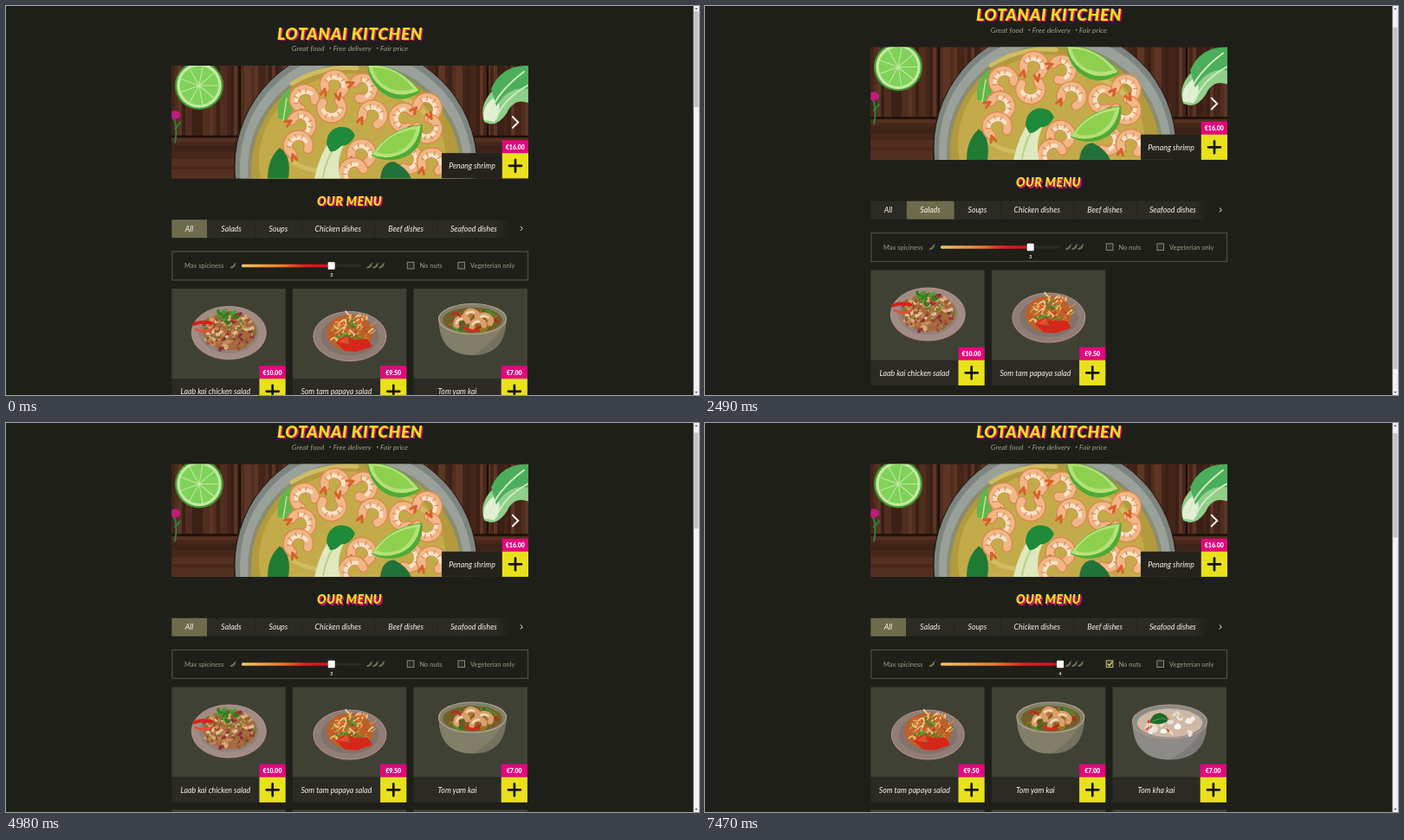
An HTML page for the animation above (8 s loop, 800 by 450 pixels).

```html
<!DOCTYPE html>
<html lang="en">
<head>
<meta charset="utf-8">
<title>Restaurant menu</title>
<style>
  html, body { margin: 0; width: 100%; height: 100%; overflow: hidden; background: #1f1f1a; }
  svg { display: block; }
  text { font: 7.5px Lato, 'Noto Sans CJK JP', sans-serif; fill: #a09c83; white-space: pre; }
  .label { font-size: 8.75px; font-style: italic; fill: #f7f4ea; }
  .tagline { font-size: 8.45px; font-style: italic; }
  .price { font-size: 7px; font-weight: 900; fill: #fff; }
  .title { font-weight: 900; font-style: italic; }
  .level { font-size: 5.2px; font-weight: 700; fill: #eee; }
  .status { font: 6.1px 'Open Sans', sans-serif; fill: #444; }
</style>
</head>
<body>
<svg id="stage" width="800" height="450" viewBox="0 0 800 450"></svg>
<script>
const YELLOW = '#e9e11b', PINK = '#e4067e', LOOP = 8000, STEP = 830;

const MENU = [
  ['Laab kai chicken salad', '10.00', 'laab'],
  ['Som tam papaya salad', '9.50', 'somtam'],
  ['Tom yam kai', '7.00', 'yam'],
  ['Tom kha kai', '7.00', 'kha'],
  ['Tom kha koong', '8.00', 'kha'],
  ['Tom yam vegetarian', '7.00', 'yam'],
  ['Tom kha vegetarian', '7.00', 'kha'],
  ["Sweet 'n sour chicken", '14.00', 'sour'],
  ['Chicken cashew', '14.00', 'cashew']
];
const TABS = [['All', 191.3, 232.2], ['Salads', 232.7, 287.7], ['Soups', 288.2, 341],
  ['Chicken dishes', 341.5, 425.4], ['Beef dishes', 425.9, 497.7], ['Seafood dishes', 498.2, 582]];

const ALL = [0, 1, 2, 3, 4, 5, 6, 7, 8];
const view = (scroll, tab, dishes, rows, more) =>
  ({ scroll, tab, dishes, rows, hover: -1, spice: 3, noNuts: false, ...more });
const VIEWS = [
  view(0, 0, ALL, 10),
  view(215, 0, ALL, 10),
  view(215, 0, ALL, 10, { hover: 1 }),
  view(21.5, 1, [0, 1], 1),
  view(21.5, 2, [2, 3, 4, 5, 6], 2, { hover: 3 }),
  view(21.5, 3, [7, 8], 1),
  view(21.5, 0, ALL, 10),
  view(21.5, 0, [1, 5, 6, 7, 8, 4], 5, { spice: 1 }),
  view(21.5, 0, ALL, 10, { spice: 4 }),
  view(21.5, 0, [1, 2, 3, 4, 5, 6], 9, { spice: 4, noNuts: true })
];

const rect = (x, y, w, h, fill, extra = '') =>
  `<rect x="${x}" y="${y}" width="${w}" height="${h}" fill="${fill}" ${extra}/>`;
const oval = (x, y, rx, ry, fill, extra = '') =>
  `<ellipse cx="${x}" cy="${y}" rx="${rx}" ry="${ry}" fill="${fill}" ${extra}/>`;
const shape = (d, fill, extra = '') => `<path d="${d}" fill="${fill}" ${extra}/>`;
const line = (d, color, width) =>
  `<path d="${d}" fill="none" stroke="${color}" stroke-width="${width}" stroke-linecap="round"/>`;
const text = (s, x, y, cls = '', anchor = 'middle', extra = '') =>
  `<text x="${x}" y="${y}" class="${cls}" text-anchor="${anchor}" ${extra}>${s}</text>`;
const move = (x, y, body, turn = 0) => `<g transform="translate(${x} ${y}) rotate(${turn})">${body}</g>`;

function random(seed) {
  return () => (seed = seed * 16807 % 2147483647) / 2147483647;
}

// Short random strokes scattered inside an ellipse.
function scatter(seed, count, colors, cy, rx, ry, length, width) {
  const rnd = random(seed * 7919);
  let out = '';
  for (let i = 0; i < count; i++) {
    const a = rnd() * 6.283, r = Math.sqrt(rnd()), b = rnd() * 6.283;
    const x = rx * r * Math.cos(a), y = cy + ry * r * Math.sin(a);
    const dx = length * Math.cos(b), dy = length * .7 * Math.sin(b);
    out += line(`M${x.toFixed(1)},${y.toFixed(1)}q${dy.toFixed(1)},${dx.toFixed(1)} ${dx.toFixed(1)},${dy.toFixed(1)}`,
      colors[Math.floor(rnd() * colors.length)], width * (.6 + rnd() * .7));
  }
  return out;
}

const plate = (rx, ry, y, fill) =>
  oval(0, y + 1.5, rx, ry, '#5a4a43') +
  oval(0, y, rx, ry, fill, 'stroke="#b9958b" stroke-width="1"') +
  oval(0, y, rx * .8, ry * .78, '#00000016');

const bowl = (r, cy, ry, bottom, fill, rim, soup) =>
  shape(`M${-r},${cy}C${-r},${bottom * .6} ${-r * .6},${bottom} 0,${bottom}S${r},${bottom * .6} ${r},${cy}Z`, fill) +
  shape(`M${r},${cy}C${r},${bottom * .6} ${r * .6},${bottom} 0,${bottom}Q${r * .7},${bottom * .5} ${r},${cy}`, '#0000001c') +
  oval(0, cy, r, ry, fill, `stroke="${rim}" stroke-width="1.2"`) +
  oval(0, cy + 1.5, r * .88, ry * .84, soup);

const FOOD = {
  laab: () => move(0, -1,
    plate(43, 30.5, 0, '#a08c84') + oval(1, -2, 31, 22, '#a36a3e') +
    scatter(5, 170, ['#c98d58', '#d9a877', '#96552c', '#b5713f', '#e0bd92', '#c0854c', '#6d7d2c', '#8a3038'], -2, 31, 22, 3, 2.7) +
    scatter(8, 10, ['#2f7d22', '#4a9a2c'], -20, 14, 7, 5, 3) +
    line('M-40,-10q10,-4 20,-1', '#d9201a', 4) + line('M-38,-4q9,4 18,0', '#ee4a35', 3)),
  somtam: () => move(0, 2,
    plate(42, 28.5, 1, '#8f7d76') + oval(0, -3, 27, 21, '#b9622a') +
    scatter(12, 75, ['#e2a14a', '#efc277', '#d87a2a', '#f0d29a', '#c23a1c', '#d9581f'], -8, 26, 18, 7, 1.5) +
    shape('M-16,8l12,-9 9,6 16,-1 5,9 -18,6 -14,-1z', '#d6261a') +
    shape('M-14,8l11,-7 3,9z', '#ef4a31') +
    scatter(4, 13, ['#3f8a2a', '#64a63a'], -8, 23, 15, 7, 1.4)),
  yam: () => move(2, -5,
    bowl(39, -12, 17.5, 30, '#827f69', '#b5a48e', '#73602a') +
    scatter(3, 34, ['#8a7a26', '#3d6f22', '#b5762c', '#a63018', '#9a6a2a'], -10, 30, 12, 5, 3) +
    [[-13, -9, -20], [-1, -17, 10], [15, -12, 25], [6, -6, -5]].map(([x, y, a]) =>
      move(x, y, line('M-7,3q1,-8 8,-7t6,6', '#d99f6c', 6.5) + line('M-6,0q3,-4 8,-3', '#f3dab5', 2.4), a)).join('') +
    line('M-8,-1q7,4 15,2', '#d72b18', 2.6) + line('M-24,-17q6,-4 10,2', '#c0271a', 2.4) +
    line('M16,-22l9,5M-22,-2l8,5', '#4d8d2b', 2.4)),
  kha: () =>
    bowl(43, -12, 19.5, 32, '#8d8b88', '#b3968a', '#cdb9a6') +
    scatter(6, 20, ['#ece1d3', '#f4ede4', '#d8b69c', '#e7d6c4'], -9, 32, 12, 6, 4) +
    scatter(9, 9, ['#d8432b', '#e8734e'], -8, 28, 10, 3, 1.8) +
    oval(9, -6, 4, 3, '#fff') + oval(-7, -1, 4, 2.5, '#fff') +
    shape('M-23,-11q2,-11 12,-11q11,3 8,10q-9,5 -20,1z', '#1d6a2a') +
    line('M-20,-12q8,-5 15,-3', '#53a044', 1),
  sour: () => move(3, 2,
    bowl(40, -8, 19, 31, '#b5a9aa', '#cbb1a9', '#9c3a16') +
    scatter(14, 75, ['#f2a41c', '#e0361c', '#f5c23a', '#d96a1e', '#ba2415', '#f08a22'], -12, 31, 17, 8, 4.2) +
    scatter(2, 6, ['#4d8d2b', '#6a4a1c'], -10, 26, 12, 6, 2.5)),
  cashew: () => move(0, 2,
    bowl(42.5, -3, 23, 27, '#96654a', '#bd8a70', '#8a451e') +
    scatter(17, 120, ['#e28a2a', '#c9331a', '#e9c27a', '#3d8a2a', '#b06a2a', '#f1d9a2', '#d3551f'], -5, 35, 20, 5, 3.2) +
    scatter(11, 9, ['#3d9a30', '#6fbb48'], -16, 18, 9, 6, 2.4))
};
const DISH = Object.fromEntries(Object.entries(FOOD).map(([name, draw]) => [name, draw()]));

// Price tag above a yellow add button.
const order = (x, y, price) =>
  rect(x, y - 15, 30.2, 15.2, PINK) + text('€' + price, x + 15, y - 4.7, 'price') +
  rect(x, y, 30.2, 29.2, YELLOW) +
  line(`M${x + 8.2},${y + 14.6}h14M${x + 15.2},${y + 7.6}v14`, '#14140f', 2.7);

function card(index, slot) {
  const [name, price, food] = MENU[index];
  const x = 191.3 + slot % 3 * 139.6, y = 327 + Math.floor(slot / 3) * 141.8;
  return rect(x, y, 131.4, 104.3, '#3f4135') + rect(x, y + 104.3, 131.4, 29, '#2b2a25') +
    move(x + 66, y + 52, DISH[food]) +
    text(name, x + 50.5, y + 122, 'label') + order(x + 101.2, y + 104.2, price);
}

const heading = (s, x, y, size, spacing) => [[PINK, 1.6], [YELLOW, 0]].map(([fill, d]) =>
  text(s, x + d, y + d * .8, 'title', 'middle',
    `style="fill:${fill};font-size:${size}px;letter-spacing:${spacing}px"`)).join('');

const shrimp = (x, y, turn) => move(x, y,
  line('M-10,8A12,12 0 1 1 9,9', '#dc8a50', 12) +
  line('M-10,8A12,12 0 1 1 9,9', '#f0b888', 9) +
  line('M-9,-3A11,11 0 0 1 10,0', '#fbe3ca', 4.5) +
  line('M-13,-2l4,2M-8,-9l2,4M1,-12l0,4M9,-8l-3,3', '#e08a50', 1.3) +
  line('M-10,9l-3,7M-10,9l3,7', '#d8602c', 3), turn);

const wedge = (x, y, turn) => move(x, y,
  shape('M-34,-8Q0,-20 34,2Q16,28 -12,16Q-28,8 -34,-8z', '#4faa35') +
  shape('M-33,-8Q0,-19 32,2Q12,20 -10,12Q-26,6 -33,-8z', '#b4e277') +
  shape('M-27,-7Q0,-15 25,2Q8,14 -10,8Q-22,3 -27,-7z', '#8ed04e'), turn);

function lime(x, y, r) {
  let spokes = '';
  for (let i = 0; i < 9; i++) {
    const a = i * .698;
    spokes += `M${x},${y}l${(r * .78 * Math.cos(a)).toFixed(1)},${(r * .78 * Math.sin(a)).toFixed(1)}`;
  }
  return oval(x, y, r, r, '#3f9a35') + oval(x, y, r * .92, r * .92, '#c5e8a0') +
    oval(x, y, r * .8, r * .8, '#7fd25a') + line(spokes, '#c5e8a0', 1.1);
}

// Upright boards above one lying board.
function wood() {
  const rnd = random(4242);
  let out = rect(191, 69, 412, 131, '#4b2a1c');
  for (let x = 191; x < 603; x += 4)
    out += rect(x, 69, 4, 82, ['#452518', '#5c3524', '#3a2016', '#512d1e'][Math.floor(rnd() * 4)]);
  for (let y = 153; y < 200; y += 4)
    out += rect(191, y, 412, 4, ['#47271a', '#553021', '#3d2218'][Math.floor(rnd() * 3)]);
  return out + line('M191,151h412M270,69v82M556,69v82', '#1b0f0a', 2.4);
}

const SHRIMPS = [[380, 90, 15], [344, 107, -35], [413, 95, 70], [376, 119, 170], [424, 125, 25], [458, 129, -80],
  [487, 117, 40], [487, 143, 150], [342, 137, 60], [337, 160, -20], [411, 170, 20], [400, 192, -60],
  [466, 177, 80], [492, 180, 10]];

const HERO = `<clipPath id="frame">${rect(191.3, 69, 411.6, 130.4, '#000')}</clipPath><g clip-path="url(#frame)">` +
  wood() +
  oval(404, 187, 141, 142, '#2a1a14') + oval(404, 186, 139.5, 140.5, '#7d8580') +
  oval(404, 187, 134, 134, '#9aa19a') + oval(404, 189, 125, 124, '#8b8c6c') + oval(404, 190, 121, 121, '#b39a3c') +
  oval(400, 180, 108, 102, '#c4ab4a') +
  line('M318,170q25,25 60,20M440,100q40,10 60,45M330,90q35,-22 75,-18', '#d0bd62', 5) +
  shape('M314,130q-2,-24 13,-34q8,20 1,38z', '#63b54a') + line('M320,132l4,-25', '#c7e2a0', 1.5) +
  shape('M302,200q0,-24 14,-36q14,8 10,36z', '#1f7b34') +
  SHRIMPS.map(s => shrimp(...s)).join('') +
  shape('M356,200Q362,170 378,150L392,158Q380,176 386,200z', '#dfe9bd') +
  line('M366,198q4,-24 17,-40', '#b9d18c', 2) +
  shape('M370,160q0,-16 14,-20q14,-2 19,10q-6,12 -16,12q-8,8 -13,6z', '#1f8a3a') +
  shape('M432,200q2,-20 16,-20q16,8 20,20z', '#23713a') +
  wedge(447, 86, 18) + wedge(453, 157, -40) +
  lime(223, 92, 28) +
  shape('M552,134Q545,112 566,94Q574,76 603,69V112Q586,106 578,124Q566,142 552,134z', '#8fd08a') +
  shape('M552,132Q548,116 566,104Q574,120 564,134z', '#e3f0d4') +
  shape('M560,96Q572,68 603,69V96Q580,92 566,116z', '#4cae5b') +
  line('M558,126Q566,100 598,76M566,130Q574,108 602,92', '#d5edc3', 2) +
  line('M193,128q6,12 2,30M195,142l6,-7', '#2f7d3a', 2) + oval(195, 126, 6, 5, '#c21a82') + '</g>';

const chevron = (x, y, s, w) => line(`M${x - s / 2},${y - s}l${s},${s}l${-s},${s}`, '#fff', w);
const pepper = x => line(`M${x - 2.6},302.4q3.4,-.4 4.2,-3.6`, '#75725a', 2) + line(`M${x + 1.6},298.6l1.2,-1.6`, '#75725a', .9);
const checkbox = (x, checked) =>
  rect(x, 296.4, 7.6, 7.6, '#2b2a25', `stroke="${checked ? '#c9c47a' : '#8a8770'}" stroke-width="1"`) +
  (checked ? line(`M${x + 1.7},300.3l1.8,1.9l3,-4`, '#e6e070', 1.3) : '');

function filters({ spice, noNuts }) {
  const x = 272.5 + 34.4 * spice;
  return rect(191.9, 284.1, 410.6, 32.9, 'none', 'stroke="#4d4c3b" stroke-width="1.3"') +
    text('Max spiciness', 206, 303, '', 'start') + pepper(262.5) +
    rect(272, 299, 138, 3, '#2d2c26', 'rx="1.5"') +
    rect(272, 298.8, x - 272, 3.4, 'url(#heat)', 'rx="1.5"') +
    rect(x - 4, 296.3, 8, 8.4, '#fff', 'rx="1"') + text(spice, x, 313, 'level') +
    [420, 427, 434].map(pepper).join('') +
    checkbox(463.3, noNuts) + text('No nuts', 477.5, 303, '', 'start') +
    checkbox(521.9, false) + text('Vegeterian only', 536, 303, '', 'start');
}

const tabs = ({ tab, hover }) => TABS.map(([name, from, to], i) =>
  rect(from, 247.2, to - from, 21, i === tab || i === hover ? '#6d6b4c' : '#2b2a25') +
  text(name, (from + to) / 2 - .2, 260.8, 'label')).join('') +
  rect(565, 247, 18, 22, 'url(#fade)') + chevron(595.2, 257.4, 2.2, 1);

function scrollbar({ scroll, rows }) {
  const scale = 438 / (357 + 142 * rows);
  return rect(793.6, 0, 6.4, 450, '#f1f1f1') +
    rect(794.4, 6 + scroll * scale, 5, 450 * scale, '#c1c1c1') +
    shape('M795.2,4l1.7,-2l1.7,2zM795.2,446l1.7,2l1.7,-2z', '#555');
}

const status = () => shape('M0,441h134.5q2.5,0 2.5,2.5v6.5h-137z', '#eceded') +
  text('127.0.0.1:5500/components/Main/index.html#', 2, 447.8, 'status', 'start');

const DEFS = `<defs>
  <linearGradient id="heat"><stop stop-color="#efc766"/><stop offset=".45" stop-color="#ea7a25"/><stop offset=".7" stop-color="#e01f1c"/><stop offset="1" stop-color="#d00a24"/></linearGradient>
  <linearGradient id="fade"><stop stop-color="#1f1f1a" stop-opacity="0"/><stop offset=".9" stop-color="#1f1f1a"/></linearGradient>
</defs>`;

const HEADER = heading('LOTANAI KITCHEN', 397, 38.6, 19, .6) +
  text('Great food ・Free delivery ・Fair price', 397, 52.2, 'tagline') +
  HERO + chevron(588, 134.5, 6.4, 2) +
  rect(503, 170.2, 70, 29.2, '#23221d') + text('Penang shrimp', 538, 188.3, 'label') + order(572.8, 170.2, '16.00') +
  heading('OUR MENU', 396.5, 230.8, 14, .4);

const render = v => DEFS + rect(0, 0, 800, 450, '#1f1f1a') +
  move(0, -v.scroll, HEADER + tabs(v) + filters(v) + v.dishes.map(card).join('')) +
  scrollbar(v) + (v.hover >= 0 ? status() : '');

const stage = document.getElementById('stage');
let shown = -1;
function tick() {
  const current = Math.floor(performance.now() % LOOP / STEP);
  if (current !== shown) stage.innerHTML = render(VIEWS[shown = current]);
  requestAnimationFrame(tick);
}
tick();
</script>
</body>
</html>
```
